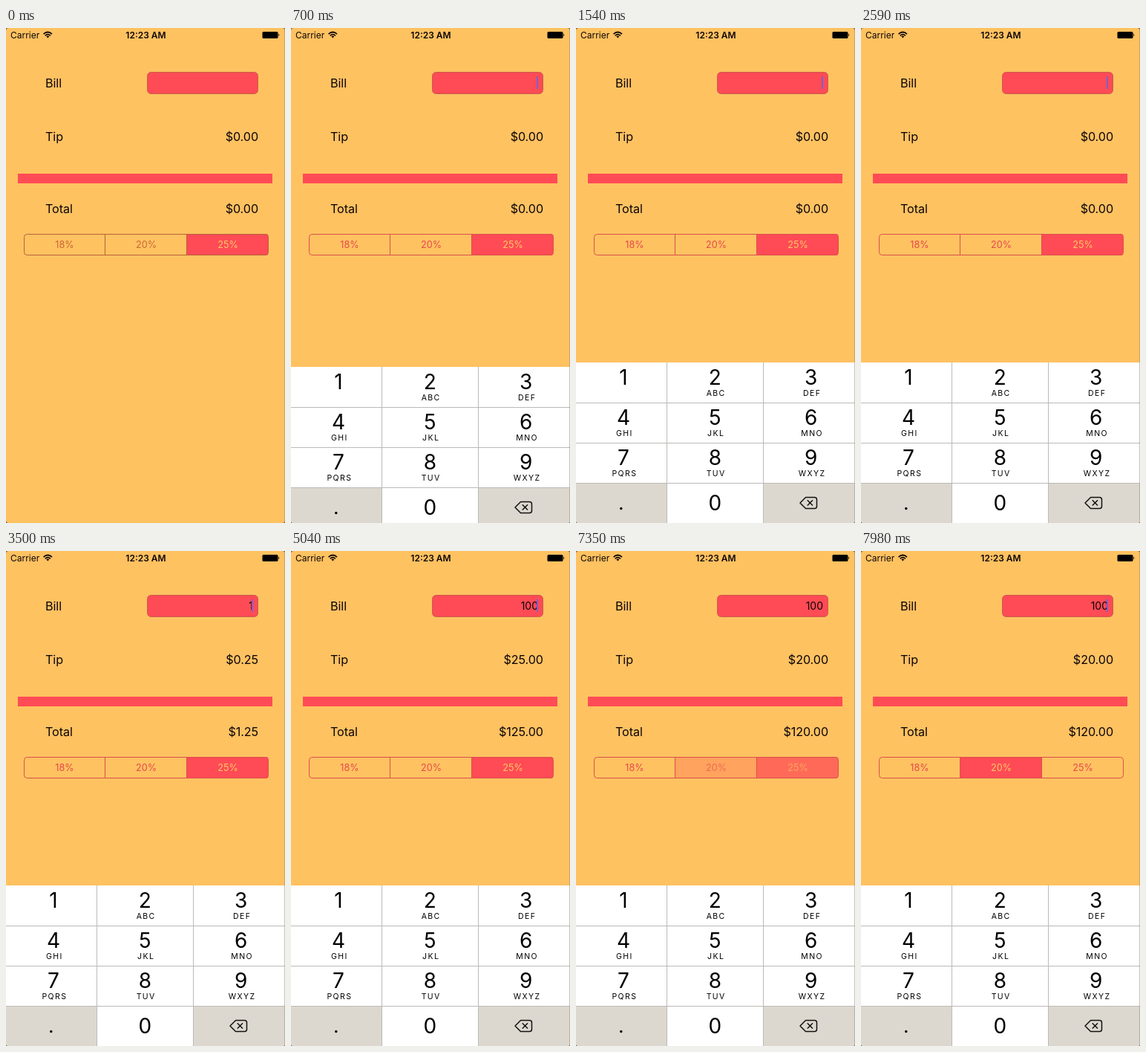
These frames come from a looping animation (376 by 666 pixels, 8 s). An HTML page:

```html
<!DOCTYPE html>
<html lang="en">
<head>
<meta charset="utf-8">
<title>Tip calculator</title>
<style>
  html, body { margin: 0; width: 100%; height: 100%; overflow: hidden; background: #79664c; }
  svg { display: block; width: 376px; height: 666px; border-radius: 4px; background: #ffc261; }
  text { font-family: Inter, "Open Sans", sans-serif; fill: #0d0508; }
  .body { font-size: 16.2px; letter-spacing: -.1px; }
  .end { text-anchor: end; }
  .mid { text-anchor: middle; }
  .status { font-size: 12px; }
  .seg { font-size: 12.6px; }
  .digit { font-size: 28px; fill: #000; }
  .letters { font-size: 10.5px; letter-spacing: 1.4px; fill: #000; }
</style>
</head>
<body>
<svg viewBox="0 0 376 666">
  <text class="status" x="6" y="13.5">Carrier</text>
  <g fill="none" stroke="#0d0508" stroke-width="1.7">
    <path d="M50.6 8.2Q56.3 2.8 62 8.2M52.7 10.4Q56.3 7 59.9 10.4"/>
    <path d="M54.3 11.3Q56.3 9.6 58.3 11.3L56.3 13.4Z" fill="#0d0508" stroke="none"/>
  </g>
  <text class="status mid" x="188.5" y="13.5" font-weight="600">12:23 AM</text>
  <rect x="345.5" y="5" width="21" height="9" rx="1.6"/>
  <path d="M367.3 7.6q2 1.9 0 3.8z"/>

  <text class="body" x="53" y="80">Bill</text>
  <text class="body" x="53" y="152">Tip</text>
  <text class="body" x="53" y="249">Total</text>
  <rect id="field" x="190.5" y="59.5" width="149" height="29" rx="5" fill="#ff4b55"/>
  <text id="bill" class="end" x="333" y="79" font-size="14"></text>
  <rect id="caret" x="331" y="65" width="2" height="17" fill="#7d5fd0"/>
  <text id="tip" class="body end" x="340" y="152"></text>
  <text id="total" class="body end" x="340" y="249"></text>
  <rect x="16" y="196" width="343" height="13" fill="#ff4b55"/>

  <clipPath id="round"><rect x="24" y="277" width="330" height="29" rx="4"/></clipPath>
  <g id="segments" clip-path="url(#round)"></g>
  <path id="outline" fill="none" d="M28.5 277.5H349.5a4 4 0 0 1 4 4V301.5a4 4 0 0 1-4 4H28.5a4 4 0 0 1-4-4V281.5a4 4 0 0 1 4-4ZM133.5 277V306M243.5 277V306"/>
  <g id="labels"></g>

  <g id="keypad">
    <rect y="450" width="376" height="216" fill="#fff"/>
    <path d="M0 612H122V666H0ZM253 612H376V666H253Z" fill="#ddd8cf"/>
    <path d="M0 504.5H376M0 558.5H376M0 612.5H376M122.5 450V666M252.5 450V666" stroke="#bcbab8"/>
    <g id="keys"></g>
    <text class="digit mid" x="187.3" y="649">0</text>
    <circle cx="60.8" cy="646.5" r="1.7"/>
    <path d="M309.5 631.5H321.5a3 3 0 0 1 3 3V643.5a3 3 0 0 1-3 3H309.5L302 639ZM311.8 635.3l7.2 7.2m0-7.2l-7.2 7.2"
      fill="none" stroke="#111" stroke-width="1.5" stroke-linejoin="round"/>
  </g>
  <path d="M375.5 0V666" stroke="#8a7a66" stroke-opacity=".45"/>
</svg>
<script>
const LOOP = 8000, SHOW = 490, SWITCH = 7250, FADE = 300;
const KEYS = [[3150, '1'], [4060, '10'], [4690, '100']];
const YELLOW = [255, 194, 97], RED = [255, 75, 85];
const $ = id => document.getElementById(id);
const clamp = v => Math.max(0, Math.min(1, v));
const ease = v => v * v * (3 - 2 * v);
const mix = (a, b, k) => `rgb(${a.map((v, i) => Math.round(v + (b[i] - v) * k))})`;

$('segments').innerHTML = [24, 133.5, 243.5].map(x =>
  `<rect x="${x}" y="277" width="110" height="29"/>`).join('');
$('labels').innerHTML = [18, 20, 25].map((p, i) =>
  `<text class="seg mid" x="${79 + 110 * i}" y="296">${p}%</text>`).join('');
$('keys').innerHTML = ['', 'ABC', 'DEF', 'GHI', 'JKL', 'MNO', 'PQRS', 'TUV', 'WXYZ'].map((s, i) => {
  const x = [64, 187.3, 316.7][i % 3], y = 480 + 54 * Math.floor(i / 3);
  return `<text class="digit mid" x="${x}" y="${y}">${i + 1}</text>
    <text class="letters mid" x="${x + 1.4}" y="${y + 15}">${s}</text>`;
}).join('');

function setText(id, s) {
  if ($(id).textContent !== s) $(id).textContent = s;
}

// Solid after each key press, then a one second blink with short fades
function caretAlpha(t, last) {
  if (t < SHOW + 70) return 0;
  const p = (t - last) % 1000;
  return p < 900 ? 1 - clamp((p - 500) / 120) : (p - 900) / 100;
}

function draw(t) {
  const [last, bill] = KEYS.filter(k => k[0] <= t).pop() || [SHOW, ''];
  const tip = bill * (t < SWITCH ? .25 : .2);
  setText('bill', bill);
  setText('tip', '$' + tip.toFixed(2));
  setText('total', '$' + (+bill + tip).toFixed(2));
  $('caret').setAttribute('opacity', caretAlpha(t, last));

  const u = Math.max(0, t - SHOW) * .0257;
  const drop = 216 * (1 + u) * Math.exp(-u);
  $('keypad').setAttribute('transform', `translate(0 ${Math.round(drop)})`);

  const dim = t < SHOW + 70;
  const ink = dim ? [200, 103, 52] : [228, 73, 75];
  $('outline').setAttribute('stroke', dim ? '#b9603a' : '#d9504c');
  $('field').setAttribute('stroke', dim ? '#c9603f' : '#c95c4b');
  const k = ease(clamp((t - SWITCH) / FADE));
  [0, k, 1 - k].forEach((on, i) => {
    $('segments').children[i].setAttribute('fill', mix(YELLOW, RED, on));
    $('labels').children[i].style.fill = mix(ink, [255, 200, 100], on);
  });
}

function tick() {
  draw(performance.now() % LOOP);
  requestAnimationFrame(tick);
}
tick();
</script>
</body>
</html>
```
